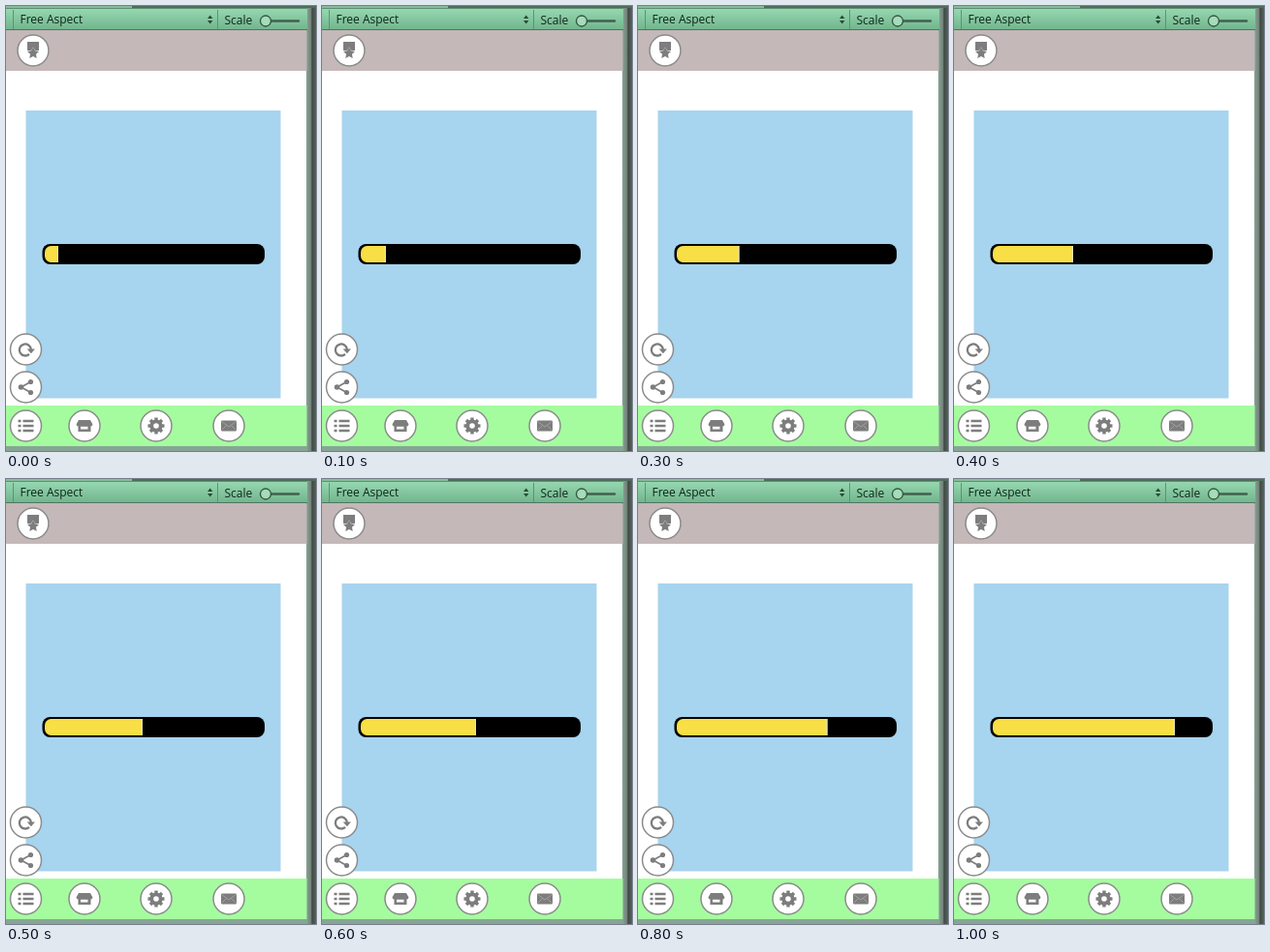
An HTML page that plays this animation: 320x460 px, repeating every 1100 ms.

```html
<!DOCTYPE html>
<html lang="en">
<head>
<meta charset="utf-8">
<title>Progress bar preview</title>
<style>
  html, body { margin: 0; width: 100%; height: 100%; overflow: hidden; background: #fff; }
  svg { display: block; width: 320px; height: 460px; }
  text { font: 500 12px "Open Sans", "Noto Sans", sans-serif; fill: #10251a; }
  .disc { fill: #fff; stroke: #8b8b8b; stroke-width: 1.5; }
  .ink { fill: #7d7d7d; }
  .line { fill: none; stroke: #7d7d7d; stroke-width: 2.3; }
</style>
</head>
<body>
<svg viewBox="0 0 320 460">
  <defs>
    <linearGradient id="tool" x2="0" y2="1">
      <stop offset="0" stop-color="#9bdcb5"/>
      <stop offset="1" stop-color="#70b48c"/>
    </linearGradient>
    <linearGradient id="side">
      <stop offset="0" stop-color="#8aa396"/>
      <stop offset=".45" stop-color="#74857b"/>
      <stop offset=".6" stop-color="#3f4a44"/>
      <stop offset="1" stop-color="#59635d"/>
    </linearGradient>
    <clipPath id="inside"><rect x="40" y="248" width="225" height="17" rx="6.5"/></clipPath>
    <g id="disc"><circle class="disc" r="16"/></g>
  </defs>

  <rect width="320" height="460" fill="#fff"/>

  <!-- window frame and toolbar -->
  <rect x="310" width="10" height="460" fill="url(#side)"/>
  <rect y="455" width="311" height="5" fill="#86a594"/>
  <rect width="311" height="25" fill="url(#tool)"/>
  <rect width="130" height="2" fill="#86bd9c"/>
  <rect x="130" width="190" height="2" fill="#4c6e5a"/>
  <rect y="2" width="311" height="1" fill="#5d8f72"/>
  <rect y="24" width="311" height="1.5" fill="#4f7560"/>
  <path d="M7.5 4V24M218.500 4V24" stroke="#5b9373"/>
  <text x="14.500" y="17.500">Free Aspect</text>
  <text x="225.500" y="19">Scale</text>
  <path d="M208 13l2.700-3.500 2.700 3.500zM208 15h5.400l-2.700 3.500z" fill="#274a36"/>
  <path d="M273 15.500H302" stroke="#41614f" stroke-width="2.500" stroke-linecap="round"/>
  <circle cx="268" cy="15.500" r="5.500" fill="#a5dcb9" stroke="#345441" stroke-width="1.300"/>

  <!-- game view -->
  <rect y="25" width="310.500" height="42" fill="#c4b8b9"/>
  <rect x="20.500" y="108" width="263" height="297.500" fill="#a7d4ee"/>
  <rect y="413" width="310.500" height="42" fill="#a5fc9f"/>

  <!-- progress bar -->
  <rect x="37.500" y="246" width="229.500" height="21" rx="8" fill="#000"/>
  <g clip-path="url(#inside)">
    <rect id="fill" x="40" y="248" height="17" fill="#f8df45"/>
    <rect id="edge" y="248" width="1.200" height="17" fill="#e9e2b0"/>
  </g>

  <!-- round buttons -->
  <g transform="translate(28 46)">
    <use href="#disc"/>
    <path class="ink" d="M-6-9H6V0H3.500L1.800-.2 0-3.500-1.800-.2-3.500 0H-6z"/>
    <path class="ink" d="M0-3.500L1.900.3 6 .9 3 3.800 3.700 8 0 6-3.700 8-3 3.800-6 .9-1.900.3z"/>
  </g>
  <g transform="translate(20.500 355)">
    <use href="#disc"/>
    <path class="line" d="M3.500 4.800A6 6 0 1 1 5.300 0"/>
    <path class="ink" d="M1.200-.5H9.500L5.400 4.200z"/>
  </g>
  <g transform="translate(20.500 394)">
    <use href="#disc"/>
    <path class="line" style="stroke-width:1.700" d="M5-5.500L-5 0 5 5.500"/>
    <g class="ink"><circle cx="-5" r="2.800"/><circle cx="5" cy="-5.500" r="2.600"/><circle cx="5" cy="5.500" r="2.600"/></g>
  </g>
  <g transform="translate(20.500 434)">
    <use href="#disc"/>
    <path class="line" d="M-8-5h3M-8 0h3M-8 5h3M-3-5H8M-3 0H8M-3 5H8"/>
  </g>
  <g transform="translate(81 434)">
    <use href="#disc"/>
    <path class="ink" fill-rule="evenodd" d="M-6-6H6L8.500-1.500Q8 .5 6.500.5V6h-13V.5Q-8 .5-8.500-1.500zM-4 .8V3.500H3.500V.8z"/>
  </g>
  <g transform="translate(155 434)">
    <use href="#disc"/>
    <circle r="4.700" class="line" style="stroke-width:3.800"/>
    <g id="teeth"></g>
  </g>
  <g transform="translate(230 434)">
    <use href="#disc"/>
    <rect class="ink" x="-8" y="-5.500" width="16" height="11" rx="1"/>
    <path d="M-7.500-4.500L0 1 7.500-4.500M-7.500 4.500L-2.500-.5M7.500 4.500L2.500-.5" fill="none" stroke="#a9a9a9" stroke-width=".8"/>
  </g>
</svg>
<script>
  const LOOP = 1100, STEP = 100, LEFT = 40;
  const ends = [54, 66, 85, 104.5, 123, 141, 159, 177, 195.5, 212, 228];
  const get = id => document.getElementById(id);

  get("teeth").innerHTML = Array.from({ length: 8 }, (_, i) =>
    `<rect class="ink" x="-1.700" y="-8.500" width="3.400" height="3.500" transform="rotate(${i * 45})"/>`
  ).join("");

  const fill = get("fill"), edge = get("edge");
  const start = performance.now();

  function draw(now) {
    const time = Math.max(0, now - start) % LOOP;
    const end = ends[Math.floor(time / STEP)];
    fill.setAttribute("width", end - LEFT);
    edge.setAttribute("x", end - 1.2);
    requestAnimationFrame(draw);
  }
  draw(start);
</script>
</body>
</html>
```
